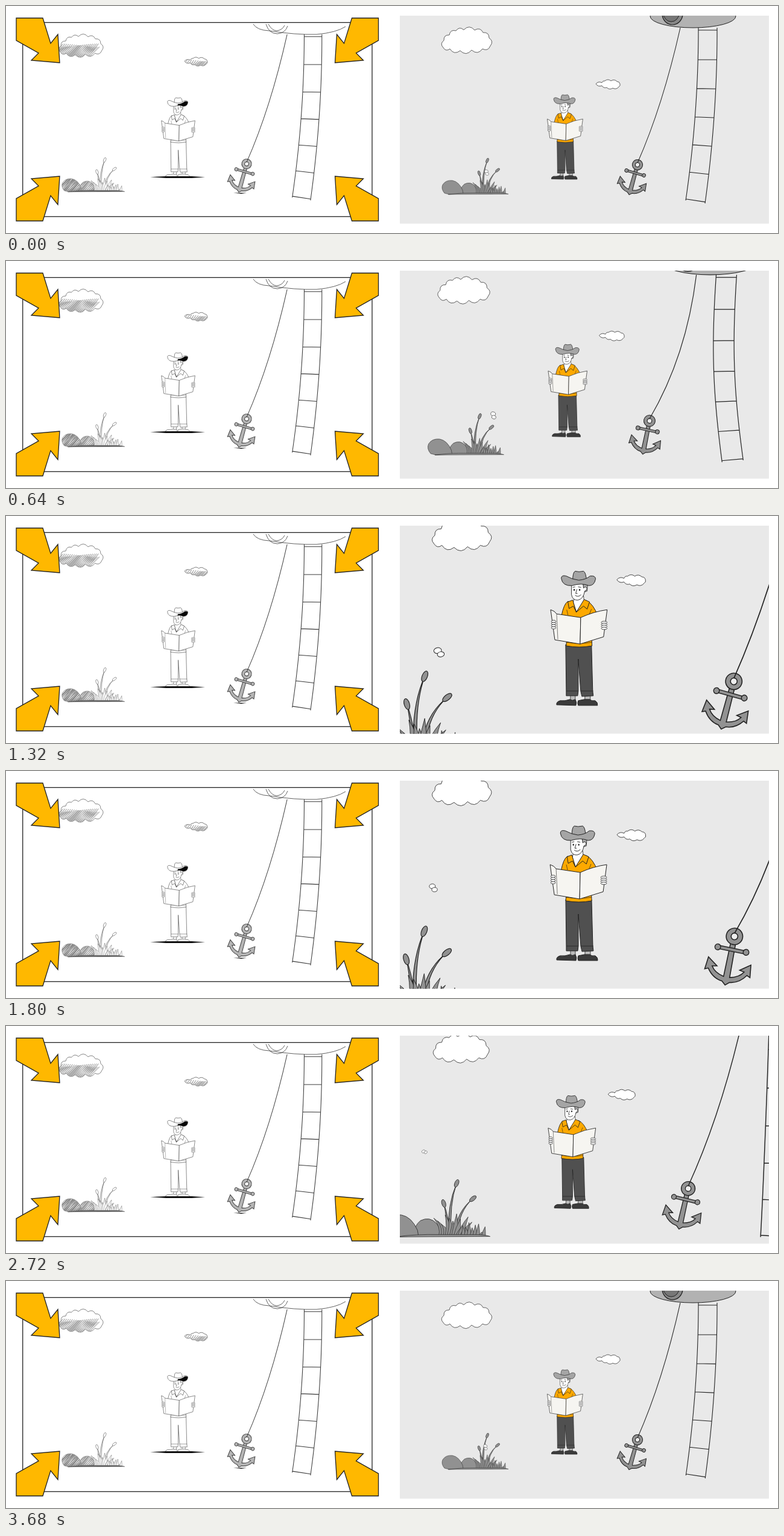
Recreate the animation shown at these times as an HTML page with a canvas. Size 1280 by 376 pixels, loop 3720 ms.

```html
<!DOCTYPE html>
<html>
<head>
<meta charset="utf-8">
<style>
html, body { margin: 0; width: 100%; height: 100%; overflow: hidden; background: #fff; }
canvas { display: block; width: 1280px; height: 376px; }
</style>
</head>
<body>
<canvas id="stage" width="1280" height="376"></canvas>
<script>
const ctx = document.getElementById('stage').getContext('2d');
const LOOP = 3720, INK = '#222', TAU = Math.PI * 2;
let sketch = false;

const clamp = v => Math.max(0, Math.min(1, v));
const cubic = u => u < .5 ? 4 * u ** 3 : 1 - 4 * (1 - u) ** 3;
const zoomAt = t => cubic(clamp((t - 130) / 1320)) - cubic(clamp((t - 2130) / 1365));

function scoped(draw) {
  ctx.save();
  draw();
  ctx.restore();
}

function paint(shape, fill, width = .8, sketchFill = '#fff') {
  const path = typeof shape === 'string' ? new Path2D(shape) : shape;
  const color = sketch ? sketchFill : fill;
  if (color) {
    ctx.fillStyle = color;
    ctx.fill(path);
  }
  if (width) {
    ctx.strokeStyle = sketch ? '#3a3a3a' : INK;
    ctx.lineWidth = width;
    ctx.stroke(path);
  }
}

function oval(x, y, rx, ry, angle = 0) {
  const path = new Path2D();
  path.ellipse(x, y, rx, ry, angle, 0, TAU);
  return path;
}

// Slanted pencil strokes of uneven length, kept inside a shape.
function hatch(path, x0, x1, y0, y1, step, color) {
  scoped(() => {
    ctx.clip(path);
    ctx.beginPath();
    for (let x = x0; x < x1; x += step) {
      ctx.moveTo(x, y1);
      ctx.lineTo(x + (y1 - y0) * .9, y0 + 3 * Math.sin(x * 1.7));
    }
    ctx.strokeStyle = color;
    ctx.lineWidth = 1.2;
    ctx.stroke();
  });
}

// Closed outline whose edges bulge outwards.
function puffs(points, bulge) {
  const path = new Path2D();
  path.moveTo(...points[0]);
  points.forEach(([x, y], i) => {
    const [nx, ny] = points[(i + 1) % points.length];
    path.quadraticCurveTo((x + nx) / 2 + (ny - y) * bulge, (y + ny) / 2 - (nx - x) * bulge, nx, ny);
  });
  path.closePath();
  return path;
}

const bigCloud = puffs([[726, 57], [735, 48], [746, 41], [759, 39.5], [777, 40], [791, 44], [801, 53],
  [803, 66], [790, 71], [772, 73], [753, 74], [736, 71], [725, 69]], .55);
const smallCloud = puffs([[978, 129], [988, 127], [993, 124], [1003, 124], [1013, 125], [1018, 129],
  [1016, 134], [1006, 136], [996, 135], [988, 132]], .4);

function drawBigCloud() {
  paint(bigCloud, '#fff', .7);
  if (sketch) hatch(bigCloud, 705, 778, 56, 80, 1.8, '#a4a4a4');
}

function drawSmallCloud() {
  paint(smallCloud, '#fff', .7);
  if (sketch) hatch(smallCloud, 975, 1012, 129, 138, 1.9, '#aaa');
}

function drawHull(sway) {
  scoped(() => {
    ctx.translate(0, 6 * sway);
    paint(oval(1139, 17, 71, 19), '#b2b2b2', 1);
    paint(oval(1105, 13, 17, 18), '#888', 1.2);
    paint(oval(1103, 12, 13, 14), '#777', 1);
  });
}

function drawLadder(sway) {
  const at = (v, side) => [
    1148 + (30 * sway - 21) * v * v - 6 * sway * Math.sin(Math.PI * v) + side * (31 + v),
    36 + 286 * v + 6 * sway * (1 - v * .4) + side * (5 - 8 * sway) * v * v
  ];
  const path = new Path2D();
  for (const side of [0, 1]) {
    path.moveTo(...at(0, side));
    for (let v = .05; v < 1.01; v += .05) path.lineTo(...at(v, side));
  }
  for (let i = 0; i < 7; i++) {
    const v = .014 + i * .172 - i * i * .0015;
    path.moveTo(...at(v, 0));
    path.lineTo(...at(v, 1));
  }
  paint(path, null, 1.1, null);
}

function drawAnchor(sway, phase) {
  const bulge = 5 + 7 * sway * sway;
  const rope = new Path2D();
  rope.moveTo(1118, 36 + 6 * sway);
  rope.quadraticCurveTo(1079 + bulge * 2, 165, 1047, 260);
  scoped(() => {
    ctx.translate(1047, 263);
    ctx.rotate(.235 + .045 * Math.cos(phase + .6));
    const metal = '#929292', pale = '#b5b5b5';
    paint('M-2.6 7 L2.6 7 L3.2 43 Q13 41 17 34.5 L12 33.5 L22.5 26 L24 39 L20.5 37.5 Q14 47 4 48 L0 51.5 L-4 48 Q-14 47 -20.5 37.5 L-24 39 L-22.5 26 L-12 33.5 L-17 34.5 Q-13 41 -3.2 43 Z', metal, 1, pale);
    paint('M-14 12.2 L14 12.6 L14 16 L-14 15.6 Z', metal, .9, pale);
    for (const x of [-15, 15]) paint(oval(x, 14, 3, 3.1), metal, .9, pale);
    paint(oval(0, 0, 8.6, 8.6), metal, 1, pale);
    paint(oval(0, 0, 3.5, 3.5), '#eee', 1);
  });
  paint(rope, null, 1.05, null);
}

function drawPlants() {
  const gray = '#919191';
  const big = new Path2D('M727 310 Q721 303 724 296 Q729 288 740 289 Q751 291 757 305 L758 311 L735 312 Z');
  const small = new Path2D('M754 309 Q753 301 760 295 Q770 290 777 298 Q782 304 781 311 L757 311 Z');
  paint(small, gray, .5);
  paint(big, gray, .5);
  if (sketch) {
    hatch(big, 710, 755, 286, 313, 1.6, '#888');
    hatch(small, 742, 780, 289, 313, 1.7, '#999');
  }
  const stalks = [[791, 310, 789, 278, 798, 256], [797, 310, 799, 285, 815, 272],
    [789, 310, 789, 292, 784.5, 277]];
  for (const [x, y, cx, cy, tx, ty] of stalks) {
    paint(`M${x - 1.6} ${y} Q${cx - .9} ${cy} ${tx} ${ty} Q${cx + 1.2} ${cy} ${x + 1.6} ${y} Z`, gray, .55);
    paint(oval(tx, ty, 2, 4.2, Math.atan2(tx - cx, cy - ty)), gray, .55);
  }
  const blade = (x, tipX, tipY, w) =>
    paint(`M${x - w} 311 Q${x - w * .4} ${(tipY + 311) / 2} ${tipX} ${tipY} Q${x + w} ${(tipY + 311) / 2} ${x + w} 311 Z`, gray, .4);
  for (let i = 0; i < 11; i++)
    blade(783 + i * 2.2, 774 + i * 4, 291 - 5 * Math.sin(i * 2.1 + 1) + Math.abs(i - 5) * 1.1, 3.6);
  for (let i = 0; i < 8; i++)
    blade(805 + i * 3, 804 + i * 3.4, 300 + 3 * Math.sin(i * 2.4) + (i > 5 ? 4 : 0), 2.2);
  paint('M733 312 Q755 309 780 309.5 L820 309.5 Q829 310 833 311.5 Z', gray, .45, '#666');
}

// Drawn at its closest size; the pivot matches the camera focus of the figure.
function drawMan(lean) {
  scoped(() => {
    ctx.translate(889.6, 241.5);
    ctx.scale(1 / 1.593, 1 / 1.593);
    ctx.translate(-889.6, -241.5);
    ctx.lineJoin = 'round';
    const yellow = '#fea900', page = '#f6f5f1', dark = '#505050';

    paint('M936 296 L944 296 L944 307 L936 307 Z M960 296 L969 296 L969 307 L960 307 Z', '#bbb');
    paint('M935 304 Q927 307 919 306 Q912 308 913 313 L945 314 Q947 309 944 304 Q939 307 935 304 Z', '#3b3b3b', 1);
    paint('M959 304 L949 306 Q947 310 949 314 L981 314 Q982 309 977 306 Q971 307 968 304 Z', '#3b3b3b', 1);
    paint('M928 213 L971 213 L973 290 L974 298 L955 299 L953 290 L949 237 L949 290 L948 298 L929 298 L929 290 Z', dark, 1);
    paint('M929 290 L949 290 M953 290 L974 290', null, .8, null);

    scoped(() => {
      ctx.translate(lean * .5, 0);
      paint('M931 141 Q924 145 920 166 L930 190 L928 215 Q950 219 971 215 L970 190 L981 166 Q973 145 962 140 L945 147 Z', yellow, 1);
      paint('M928 209 Q950 213 971 209 M929 155 L931 164 M970 154 L966 164', null, .7, null);
    });
    scoped(() => {
      ctx.translate(lean, 0);
      paint('M941 134 L956 132 L957 142 L944 159 L939 143 Z', '#fff', .8);
      paint('M955 111 L963 111 L962 124 L956 126 Z', '#aaa', .8);
      paint('M936 112 L936 130 Q938 140 947 139 Q956 137 958 124 Q963 122 961 118 Q959 116 956 119 L955 111 Z', '#fff', .9);
      ctx.fillStyle = INK;
      ctx.fill(oval(940.5, 122, 1.2, 1.6));
      ctx.fill(oval(949.5, 122, 1.2, 1.6));
      paint('M945 121 L943 128 L946 128 M942 131 Q947 135 952 130 M938 118 L942 117 M947 117 L952 118', null, .9, null);
      paint('M938 139 L930 142 L932 153 L939 149 L944 159 Z M957 138 L966 142 L962 154 L956 149 L944 159 Z', yellow, 1);
      paint('M938 107 Q938 93 942 91 Q948 93 956 91 Q960 93 961 107 Q950 112 938 107 Z', '#a5a5a5', 1);
      paint('M919 103 Q919 97 927 99 Q938 105 948 106 Q960 105 967 99 Q976 98 976 104 Q974 115 965 115 Q952 110 937 115 Q921 116 919 103 Z', '#a5a5a5', 1);
      if (sketch) {
        ctx.fillStyle = '#080808';
        ctx.fill(new Path2D('M948 109 Q960 108 968 101 Q976 100 976 105 Q974 115 963 115 Q955 111 947 113 Z'));
      }
    });
    scoped(() => {
      ctx.translate(lean * .6, 0);
      paint('M902 155 Q909 157 912 162 L952 168 L951 212 L909 205 Z', page, 1);
      paint('M952 168 Q974 158 996 155 L990 200 L951 212 Z', page, 1);
      paint('M912 162 L914 204', null, .6, null);
      for (let i = 0; i < 4; i++) {
        paint(oval(907, 174.5 + i * 3.5, 3.8, 2), '#fff', .8);
        paint(oval(991, 176 + i * 3.3, 5, 2), '#fff', .8);
      }
    });
  });
}

// Butterfly circuit in plant space: time, x, y.
const circuit = [[0, 797, 276], [640, 818, 255], [1320, 809, 238], [2240, 797, 213.5],
  [2720, 764.5, 223], [3040, 756.5, 244]];

function along(t) {
  const n = circuit.length;
  const stop = i => {
    const turn = Math.floor(i / n), p = circuit[i - turn * n];
    return [p[0] + turn * LOOP, p[1], p[2]];
  };
  let i = 0;
  while (stop(i + 1)[0] <= t) i++;
  const [a, b, c, d] = [i - 1, i, i + 1, i + 2].map(stop);
  const span = c[0] - b[0], u = (t - b[0]) / span;
  return [1, 2].map(j => {
    const m0 = (c[j] - a[j]) / (c[0] - a[0]) * span, m1 = (d[j] - b[j]) / (d[0] - b[0]) * span;
    return b[j] + u * m0 + u * u * (3 * (c[j] - b[j]) - 2 * m0 - m1) + u ** 3 * (2 * (b[j] - c[j]) + m0 + m1);
  });
}

function drawButterfly(t) {
  const [x, y] = along(t);
  const flap = 1.7 + 1.1 * Math.abs(Math.cos(TAU * t / 620));
  const size = .8 + .25 * Math.cos(TAU * (t - 600) / LOOP);
  scoped(() => {
    ctx.translate(x, y);
    ctx.rotate(-.9 * Math.sin(TAU * t / 1240));
    ctx.scale(size, size);
    paint(oval(-.7, -flap * .8, 3.3, flap, .2), '#fff', .5);
    paint(oval(.7, flap * .8, 3, flap * .9, .2), '#fff', .5);
  });
}

function drawArrows() {
  const shape = new Path2D('M17 20 L61 20 L74 62 L86 47 L89 94 L42 90 L54 78 L17 57 Z');
  for (const [sx, sy] of [[1, 1], [-1, 1], [1, -1], [-1, -1]]) scoped(() => {
    ctx.transform(sx, 0, 0, sy, sx < 0 ? 634.5 : 0, sy < 0 ? 376 : 0);
    paint(shape, '#ffb800', 1.3);
  });
}

function drawLeft() {
  ctx.strokeStyle = INK;
  ctx.lineWidth = 1.3;
  ctx.strokeRect(27.7, 27.4, 579.3, 321.4);
  sketch = true;
  paint('M410 30 Q416 40 436 41 Q480 48 515 47 Q548 44 563 34 M431 30 Q436 46 450 46 Q463 45 467 33 M435 30 Q441 41 449 41 Q458 40 462 32', null, .8, null);
  scoped(() => {
    ctx.transform(.945, 0, 0, .945, -590.4, 13);
    scoped(() => {
      ctx.translate(46, 3);
      ctx.scale(.93, .93);
      drawBigCloud();
    });
    scoped(() => {
      ctx.translate(-40, -46);
      drawSmallCloud();
    });
    drawLadder(0);
    drawAnchor(0, 0);
    drawPlants();
    drawMan(0);
  });
  ctx.fillStyle = '#111';
  ctx.fill(new Path2D('M239 283.2 L265 282 L308 282 L330 283.4 L308 285 L265 285 Z M377 309.6 L399 309.6 L390 311 Z'));
  sketch = false;
  drawArrows();
}

function drawRight(t) {
  const q = zoomAt(t), phase = TAU * 3 * t / LOOP;
  const sway = (1 - Math.cos(phase)) / 2;
  const lean = 2.2 * Math.sin(TAU * t / LOOP);
  const layer = (cx, cy, depth, bowX, bowY, draw) => scoped(() => {
    const s = 1 / (1 - depth * q), bow = q * (1 - q);
    ctx.translate(cx + bowX * bow, cy + bowY * bow);
    ctx.scale(s, s);
    ctx.translate(-cx, -cy);
    draw();
  });
  scoped(() => {
    ctx.beginPath();
    ctx.rect(653, 16, 612, 344.5);
    ctx.clip();
    ctx.fillStyle = '#e9e9e9';
    ctx.fillRect(653, 16, 612, 345);
    layer(809, 195.6, .153, -18, -18, drawBigCloud);
    layer(790, 255, .157, -9, -5, drawSmallCloud);
    layer(775.5, 244.5, .372, -32, 0, () => {
      drawLadder(sway);
      drawAnchor(sway, phase);
      drawHull(sway);
    });
    layer(885, 248, .546, 0, 0, () => {
      drawPlants();
      drawButterfly(t);
    });
    layer(889.6, 241.5, .372, 0, 0, () => drawMan(lean));
  });
}

function frame(now) {
  ctx.fillStyle = '#fff';
  ctx.fillRect(0, 0, 1280, 376);
  drawLeft();
  drawRight(now % LOOP);
  requestAnimationFrame(frame);
}
requestAnimationFrame(frame);
</script>
</body>
</html>
```
